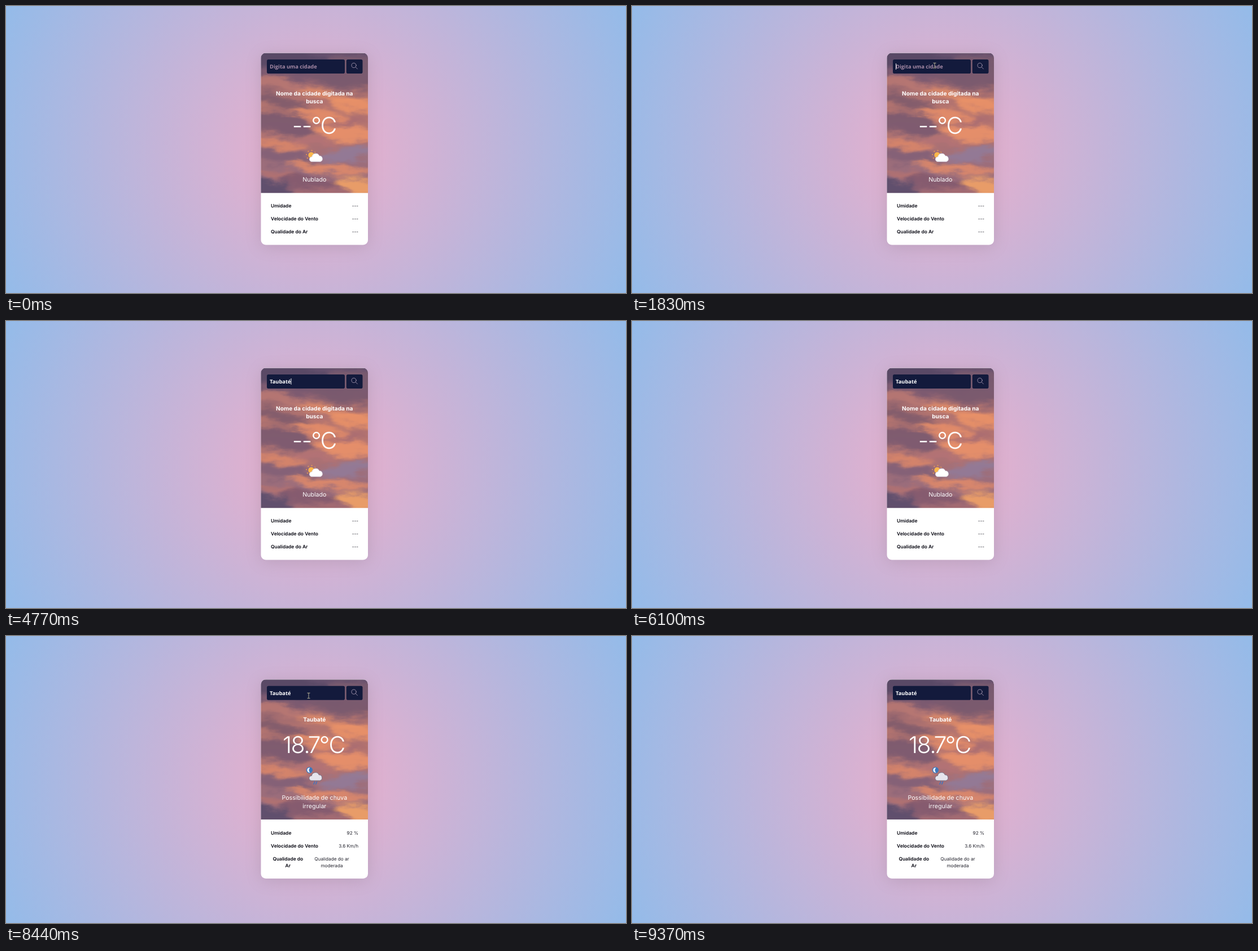
Recreate the animation shown at these times as an HTML page. Size 1098 by 510 pixels, loop 9.99 s.

```html
<!DOCTYPE html>
<html lang="pt-BR">
<head>
<meta charset="utf-8">
<title>Previsão do tempo</title>
<style>
html, body { margin: 0; width: 100%; height: 100%; overflow: hidden; }
svg { display: block; width: 1098px; height: 510px; }
text { font-family: Inter, Lato, sans-serif; text-rendering: geometricPrecision; white-space: pre; }
.mid { text-anchor: middle; }
.end { text-anchor: end; }
.city { font-size: 10.1px; font-weight: 700; fill: #fff; }
.temp { font-size: 41px; font-weight: 300; fill: #fff; }
.desc { font-size: 10.65px; fill: #fff; }
.label { font-size: 8.45px; font-weight: 600; fill: #05050f; }
.value { font-size: 8.2px; fill: #22222c; }
.field { font: 700 9.3px "Open Sans", "Noto Sans", sans-serif; }
#ibeam { mix-blend-mode: difference; }
</style>
</head>
<body>
<svg viewBox="0 0 1098 510" xmlns="http://www.w3.org/2000/svg">
  <defs>
    <radialGradient id="bg" gradientUnits="userSpaceOnUse" cx="549" cy="255" r="605.3">
      <stop offset="0" stop-color="#eeaeca"/><stop offset="1" stop-color="#94bbe9"/>
    </radialGradient>
    <linearGradient id="sky" x1="0" y1="0" x2="0" y2="1">
      <stop offset=".12" stop-color="#65506e"/><stop offset=".26" stop-color="#7f5b70"/>
      <stop offset=".36" stop-color="#b0726f"/><stop offset=".5" stop-color="#b8766f"/>
      <stop offset=".64" stop-color="#a97074"/><stop offset=".76" stop-color="#946b7e"/>
      <stop offset=".9" stop-color="#a46a70"/>
    </linearGradient>
    <filter id="shade" x="-40%" y="-25%" width="180%" height="150%"><feGaussianBlur stdDeviation="14"/></filter>
    <filter id="cloudy" filterUnits="userSpaceOnUse" x="-40" y="-40" width="270" height="330" color-interpolation-filters="sRGB">
      <feGaussianBlur in="SourceGraphic" stdDeviation="5 3.5" result="soft"/>
      <feTurbulence type="fractalNoise" baseFrequency=".025 .06" numOctaves="4" seed="3"/>
      <feDisplacementMap in="soft" scale="24" xChannelSelector="R" yChannelSelector="G"/>
    </filter>
    <clipPath id="frame"><path d="M0 249V8.5A8.5 8.5 0 0 1 8.5 0H181A8.5 8.5 0 0 1 189.5 8.5V249Z"/></clipPath>
    <path id="cloud" d="M541 257a4.3 4.3 0 0 1 .3-8.6 6.8 6.8 0 0 1 13-1.6 5.2 5.2 0 0 1 1.6 10.2z"/>
  </defs>

  <rect width="1098" height="510" fill="url(#bg)"/>
  <rect id="shadow" x="451.5" width="189.5" rx="8.5" fill="#64646f" opacity=".22" filter="url(#shade)"/>
  <rect id="card" x="451.5" width="189.5" rx="8.5" fill="#fff"/>

  <g id="top">
    <g clip-path="url(#frame)"><g id="photo" filter="url(#cloudy)">
      <rect x="-40" y="-40" width="270" height="330" fill="url(#sky)"/>
    </g></g>
    <rect x="10.5" y="11.5" width="138" height="25" rx="2.8" fill="#131a3c"/>
    <rect x="151.3" y="11.5" width="28.7" height="25" rx="2.8" fill="#131a3c"/>
    <g fill="none" stroke="#b3a3ba" stroke-width=".8" stroke-linecap="round">
      <circle cx="164.6" cy="22" r="4.1"/><path d="M167.6 25l3.3 3.4"/>
    </g>
    <text id="typed" class="field" x="15.6" y="27.4"></text>
    <rect id="caret" y="18.5" width=".9" height="11" fill="#fff"/>
  </g>

  <g id="before">
    <text class="city mid" x="546.3" y="159.3">Nome da cidade digitada na</text>
    <text class="city mid" x="546.3" y="172.5">busca</text>
    <text class="temp mid" x="516 533 549.5 571.5" y="227">--°C</text>
    <circle cx="540.5" cy="265" r="8.4" fill="none" stroke="#f2a04c" stroke-width="1.7" stroke-dasharray="1.7 4.9"/>
    <circle cx="540.5" cy="265" r="5.2" fill="#fbb74b"/>
    <use href="#cloud" y="19.6" x=".6" fill="#fff" stroke="#d9d4e2" stroke-width=".9"/>
    <text class="desc mid" x="546.3" y="311.7">Nublado</text>
    <text class="label" x="469" y="358.3">Umidade</text>
    <text class="label" x="469" y="381.3">Velocidade do Vento</text>
    <text class="label" x="469" y="404.3">Qualidade do Ar</text>
    <text class="value end" x="624" y="358.3">---</text>
    <text class="value end" x="624" y="381.3">---</text>
    <text class="value end" x="624" y="404.3">---</text>
  </g>

  <g id="after">
    <text class="city mid" x="546.3" y="152.4">Taubaté</text>
    <text class="temp mid" x="498 517 533 546 564 586.5" y="207.5">18.7°C</text>
    <circle cx="537.4" cy="238.3" r="5.6" fill="#3b78bd"/>
    <path d="M538.6 234a4.4 4.4 0 1 0 0 8.6a5.4 5.4 0 0 1 0-8.6z" fill="#f4f6fb"/>
    <use href="#cloud" fill="#e6e5ec" stroke="#6d6a80" stroke-width=".9"/>
    <path d="M546.8 259l-1.9 4.3M550.6 259l-1.9 4.3" stroke="#3874c4" stroke-width="1.5" stroke-linecap="round"/>
    <text class="desc mid" x="546.3" y="291.4">Possibilidade de chuva</text>
    <text class="desc mid" x="546.3" y="306.4">irregular</text>
    <text class="label" x="469" y="353">Umidade</text>
    <text class="label" x="469" y="376">Velocidade do Vento</text>
    <text class="label mid" x="499.3" y="399">Qualidade do</text>
    <text class="label mid" x="499.3" y="410.6">Ar</text>
    <text class="value end" x="624" y="353">92 %</text>
    <text class="value end" x="624" y="376">3.6 Km/h</text>
    <text class="value mid" x="577" y="399">Qualidade do ar</text>
    <text class="value mid" x="577" y="410.6">moderada</text>
  </g>

  <path id="ibeam" d="M-2.5-4.7H2.5M0-4.7V4.7M-2.5 4.7H2.5" fill="none" stroke="#ddd" stroke-width=".9"/>
  <path id="arrow" d="M0 0V9.6L2.2 7.6 3.7 11 5.1 10.4 3.6 7.1H6.8Z" fill="#fff" stroke="#111" stroke-width=".6"/>
</svg>
<script>
const $ = id => document.getElementById(id);
const set = (el, attrs) => { for (const k in attrs) el.setAttribute(k, attrs[k]); };
const show = (el, on) => { el.style.display = on ? "" : "none"; };

// Cloud streaks: x, y, half width, half height, tilt, colour
const streaks = [
  [40, 10, 80, 20, 4, "#574866"], [165, 20, 50, 18, 6, "#7b5c70"],
  [150, 50, 60, 12, 6, "#7a5a6e"], [30, 54, 60, 10, 8, "#bd7a72"],
  [125, 74, 60, 8, 8, "#e08b69"], [165, 92, 45, 13, 8, "#ef9468"],
  [35, 88, 65, 10, 14, "#7d5a6d"], [105, 110, 55, 9, 8, "#e88f69"],
  [30, 125, 60, 20, 10, "#765870"], [155, 122, 40, 6, -6, "#a86c72"],
  [150, 143, 60, 13, 6, "#ee9369"], [95, 158, 40, 6, 6, "#b47376"],
  [35, 163, 50, 7, 6, "#dd8869"], [155, 180, 48, 13, -8, "#917c9b"],
  [40, 185, 60, 11, 8, "#806077"], [120, 206, 75, 8, 6, "#e68c69"],
  [35, 215, 45, 7, 10, "#b57270"], [90, 230, 55, 12, 6, "#82596e"],
  [15, 240, 45, 16, 10, "#564a6b"], [170, 236, 40, 14, 10, "#f6a566"]
];
for (const [x, y, rx, ry, tilt, fill] of streaks) {
  const e = document.createElementNS("http://www.w3.org/2000/svg", "ellipse");
  set(e, { rx, ry, fill, opacity: .85, transform: `translate(${x} ${y}) rotate(${tilt})` });
  $("photo").append(e);
}

const LOOP = 9990, TICK = 70, RESULT = 6580;
const word = "Taubaté";
const keyTimes = [2970, 3170, 3300, 3440, 3840, 4310, 4770];
const blinks = [1760, 2290, 2750, 4970, 5570, 6100, 6650, 7180, 7710, 8240, 8770, 9300];
const moves = [190, 1430, 8440, 9200];
const path = [
  [190, 978, 474], [400, 800, 355], [680, 582, 219], [820, 553, 150], [1030, 539, 99],
  [1430, 539, 99], [1760, 536, 106], [8440, 536, 106], [8990, 928, 335],
  [9200, 928, 335], [9340, 1019, 483]
];
const passed = (times, t) => times.filter(s => s <= t).length;

function pointerAt(t) {
  const start = moves[passed(moves, t) - 1];
  const s = start + TICK * Math.floor((t - start) / TICK);
  const i = path.findIndex(p => p[0] > s);
  if (i < 0) return path[path.length - 1].slice(1);
  const [t0, x0, y0] = path[i - 1], [t1, x1, y1] = path[i];
  const k = (s - t0) / (t1 - t0);
  return [x0 + (x1 - x0) * k, y0 + (y1 - y0) * k];
}

function drawPointer(t) {
  const seen = (t >= 190 && t < 2970) || (t >= 8440 && t < 9370);
  const [x, y] = seen ? pointerAt(t) : [0, 0];
  const overText = (x > 462 && x < 600 && y > 88 && y < 120) ||
                   (x > 470 && x < 622 && y > 143 && y < 232);
  show($("ibeam"), seen && overText);
  show($("arrow"), seen && !overText);
  set($(overText ? "ibeam" : "arrow"), { transform: `translate(${x} ${y})` });
}

function draw(t) {
  const done = t >= RESULT;
  const y = done ? 77 : 83.5, height = done ? 354 : 341;
  set($("card"), { y, height });
  set($("shadow"), { y: y + 4, height });
  set($("top"), { transform: `translate(451.5 ${done ? 77.2 : 83.5})` });
  show($("before"), !done);
  show($("after"), done);

  const n = passed(keyTimes, t), typed = $("typed");
  const content = n ? word.slice(0, n) : "Digita uma cidade";
  if (typed.textContent !== content) typed.textContent = content;
  set(typed, { fill: n ? "#fff" : "#a68aa5" });
  set($("caret"), { x: 15.6 + (n ? typed.getComputedTextLength() : 0) });
  show($("caret"), passed(blinks, t) % 2 === 1);
  drawPointer(t);
}

const begin = performance.now();
function frame() {
  draw((performance.now() - begin) % LOOP);
  requestAnimationFrame(frame);
}
frame();
</script>
</body>
</html>
```
